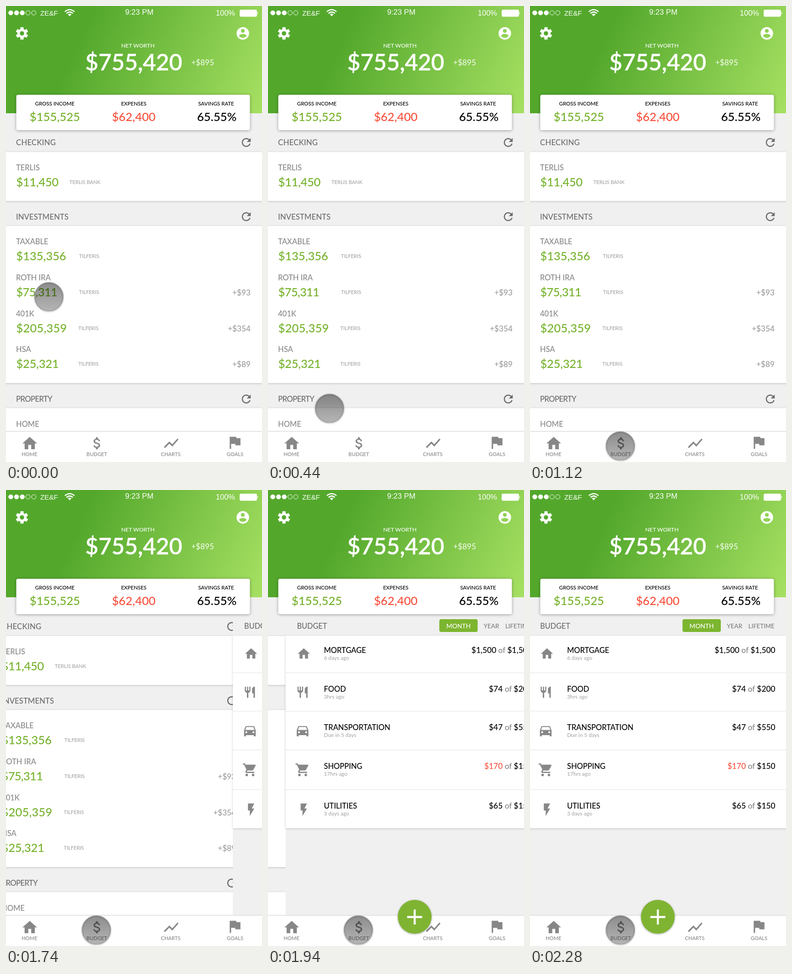
Write an HTML page that moves like this. It is 561 px wide and 999 px high and loops after 3080 ms.

```html
<!DOCTYPE html>
<html lang="en">
<head>
<meta charset="utf-8">
<title>Budget app</title>
<style>
html, body { margin: 0; width: 100%; height: 100%; overflow: hidden; background: #f0f0f0; }
svg { display: block; width: 100%; height: 100%; font-family: Lato, "Open Sans", sans-serif; font-weight: 500; }
.status { font-family: "Liberation Sans", Arial, sans-serif; font-weight: 400; }
.sheet { fill: #fff; filter: drop-shadow(0 1px 2px rgba(0,0,0,.2)); }
.card { fill: #fff; filter: drop-shadow(0 1px 3px rgba(0,0,0,.36)); }
.fab { fill: #7fb432; filter: drop-shadow(0 1px 2px rgba(0,0,0,.35)); }
.ring { filter: drop-shadow(0 1px 1.5px rgba(0,0,0,.4)); }
</style>
</head>
<body>
<svg id="stage" viewBox="0 0 561 999" preserveAspectRatio="none" xmlns="http://www.w3.org/2000/svg">
  <defs>
    <linearGradient id="sky" gradientUnits="userSpaceOnUse" x1="170" y1="60" x2="560" y2="235">
      <stop offset="0" stop-color="#53a82c"/><stop offset="1" stop-color="#a6e062"/>
    </linearGradient>
    <linearGradient id="press" x1="0" y1="0" x2="0" y2="1">
      <stop offset="0" stop-opacity=".45"/><stop offset="1" stop-opacity=".29"/>
    </linearGradient>
  </defs>
  <path id="route" d="M94 637C94 1006 198 840 198 964" fill="none"/>
  <rect width="561" height="999" fill="#f0f0f0"/>
  <g id="home"></g>
  <g id="budget"></g>
  <g id="header"></g>
  <g id="nav"></g>
  <g id="fab">
    <circle class="fab" cx="280" cy="935" r="37"/>
    <path d="M263.500 935.500H296.500M280 919V952" stroke="#fff" stroke-width="4.400"/>
  </g>
  <g id="touch">
    <circle r="31.500" fill="url(#press)"/>
    <circle class="ring" r="31.500" fill="none" stroke="#a4a4a4" stroke-width="1.200"/>
  </g>
</svg>
<script>
const $ = id => document.getElementById(id);

const GREEN = '#75b22b', RED = '#f9503c', GREY = '#878787', PALE = '#a2a2a2', DIM = '#6c6c6c';

// 24-unit icons: [path, centre x, centre y]
const icons = {
  home: ['M10 20v-6h4v6h5v-8h3L12 3 2 12h3v8z', 12, 11.5],
  refresh: ['M17.65 6.35C16.2 4.9 14.21 4 12 4c-4.42 0-7.99 3.58-7.99 8s3.57 8 7.99 8c3.73 0 6.84-2.55 7.73-6h-2.08c-.82 2.33-3.04 4-5.65 4-3.31 0-6-2.69-6-6s2.69-6 6-6c1.66 0 3.14.69 4.22 1.78L13 11h7V4z', 12, 12],
  user: ['M12 2a10 10 0 1 0 0 20 10 10 0 0 0 0-20zm0 3a3 3 0 1 1 0 6 3 3 0 0 1 0-6zm0 14.200c-2.500 0-4.710-1.280-6-3.220.03-1.990 4-3.080 6-3.080s5.970 1.090 6 3.080c-1.290 1.940-3.500 3.220-6 3.220z', 12, 12],
  dollar: ['M11.8 10.9c-2.27-.59-3-1.2-3-2.15 0-1.09 1.01-1.85 2.7-1.85 1.78 0 2.44.85 2.5 2.1h2.21c-.07-1.72-1.12-3.3-3.21-3.81V3h-3v2.16c-1.94.42-3.5 1.68-3.5 3.61 0 2.31 1.91 3.46 4.7 4.13 2.5.6 3 1.48 3 2.41 0 .69-.49 1.79-2.7 1.79-2.06 0-2.87-.92-2.98-2.1h-2.2c.12 2.19 1.76 3.42 3.68 3.83V21h3v-2.15c1.95-.37 3.5-1.5 3.5-3.55 0-2.84-2.43-3.81-4.7-4.4z', 11.4, 12],
  chart: ['M3.5 18.49l6-6.01 4 4L22 6.92l-1.41-1.41-7.09 7.97-4-4L2 16.99z', 12, 12],
  flag: ['M14.4 6L14 4H5v17h2v-7h5.6l.4 2h7V6z', 12.5, 12.5],
  fork: ['M11 9H9V2H7v7H5V2H3v7c0 2.12 1.66 3.84 3.75 3.97V22h2.5v-9.03C11.34 12.84 13 11.12 13 9V2h-2zm5-3v8h2.5v8H21V2c-2.76 0-5 2.24-5 4z', 12, 12],
  car: ['M18.92 6A1.500 1.500 0 0 0 17.500 5h-11a1.500 1.500 0 0 0-1.420 1L3 12v8a1 1 0 0 0 1 1h1a1 1 0 0 0 1-1v-1h12v1a1 1 0 0 0 1 1h1a1 1 0 0 0 1-1v-8zM6.500 16a1.500 1.500 0 1 1 0-3 1.500 1.500 0 0 1 0 3zm11 0a1.500 1.500 0 1 1 0-3 1.500 1.500 0 0 1 0 3zM5 11l1.500-4.500h11L19 11z', 12, 13],
  cart: ['M7 18a2 2 0 1 0 0 4 2 2 0 0 0 0-4zM1 2v2h2l3.6 7.59-1.35 2.45A2 2 0 0 0 7 17h12v-2H7.42c-.14 0-.25-.11-.25-.25l.93-1.75h7.45c.75 0 1.41-.41 1.75-1.03l3.58-6.49A1 1 0 0 0 20 4H5.21l-.94-2zm16 16a2 2 0 1 0 0 4 2 2 0 0 0 0-4z', 11, 12],
  bolt: ['M7 2v11h3v9l7-12h-4l4-8z', 12, 12]
};

function icon(name, x, y, scale, fill) {
  const [d, cx, cy] = icons[name];
  return `<path d="${d}" fill="${fill}" fill-rule="evenodd" transform="translate(${x} ${y}) scale(${scale}) translate(${-cx} ${-cy})"/>`;
}

function text(str, x, y, size, fill, anchor = 'start', extra = '') {
  return `<text x="${x}" y="${y}" font-size="${size}" fill="${fill}" text-anchor="${anchor}" ${extra}>${str}</text>`;
}

const sheet = (y, h) => `<rect class="sheet" x="-3" y="${y}" width="610" height="${h}"/>`;
const track = n => `letter-spacing="${n}"`;

function drawHome() {
  const sections = [['CHECKING', 299, 0.2], ['INVESTMENTS', 461.5, 0], ['PROPERTY', 861, -0.7]];
  // name, baseline, amount, institution, its x, change, tracking
  const accounts = [
    ['TERLIS', 360, '$11,450', 'TERLIS BANK', 139, '', -0.3],
    ['TAXABLE', 522, '$135,356', 'TILFERIS', 160, '', 0],
    ['ROTH IRA', 601, '$75,311', 'TILFERIS', 160, '+$93', -0.7],
    ['401K', 680, '$205,359', 'TILFERIS', 158.5, '+$354', 0.2],
    ['HSA', 758, '$25,321', 'TILFERIS', 158.5, '+$89', -0.2],
    ['HOME', 921.5]
  ];
  let out = sheet(320, 107) + sheet(482, 344) + sheet(881, 80);
  for (const [name, y, gap] of sections) {
    out += text(name, 22, y + 6, 16.8, DIM, 'start', track(gap)) + icon('refresh', 526.5, y, 1.22, DIM);
  }
  for (const [name, y, sum, bank, bankX, change, gap] of accounts) {
    out += text(name, 22, y, 16.5, GREY);
    if (!sum) continue;
    out += text(sum, 22.5, y + 35, 25.5, GREEN, 'start', track(gap));
    out += text(bank, bankX, y + 30, 11.1, PALE);
    if (change) out += text(change, 536, y + 33, 17.2, '#9a9a9a', 'end');
  }
  return out;
}

function drawBudget() {
  // icon, x, y, scale, name, baseline, note, spent, limit
  const rows = [
    ['home', 37, 358, 1.32, 'MORTGAGE', 357, '6 days ago', '$1,500', '$1,500'],
    ['fork', 34.3, 443, 1.23, 'FOOD', 441.5, '3hrs ago', '$74', '$200'],
    ['car', 34.3, 528.5, 1.42, 'TRANSPORTATION', 526, 'Due in 5 days', '$47', '$550'],
    ['cart', 33, 613, 1.4, 'SHOPPING', 610.5, '17hrs ago', '$170', '$150'],
    ['bolt', 37, 700.5, 1.38, 'UTILITIES', 698, '3 days ago', '$65', '$150']
  ];
  let out = '<rect x="-3" y="235" width="620" height="720" fill="#f0f0f0"/>' + sheet(319, 422);
  out += '<path d="M-3 400.500H600M-3 484.500H600M-3 569.500H600M-3 656.500H600" stroke="#e3e3e3"/>';
  out += text('BUDGET', 22, 303.5, 16.3, DIM);
  out += '<rect x="334" y="283" width="84" height="28" rx="4" fill="#7cb52f"/>';
  out += text('MONTH', 376, 302.5, 13.8, '#fff', 'middle');
  out += text('YEAR', 448, 302.5, 13.5, '#7c7c7c', 'middle');
  out += text('LIFETIME', 507, 302.5, 13.2, '#7c7c7c', 'middle');
  for (const [pic, x, y, scale, name, base, note, spent, limit] of rows) {
    const tint = pic === 'cart' ? RED : '#000';
    out += icon(pic, x, y, scale, GREY) + text(name, 81, base, 16.5, '#000');
    out += text(note, 81, base + 15.3, 11.9, '#a8a8a8');
    out += text(`<tspan fill="${tint}">${spent}</tspan> of <tspan fill="#000">${limit}</tspan>`, 537.5, base, 17.4, '#858585', 'end');
  }
  return out;
}

function drawStatus() {
  let out = '';
  for (let i = 0; i < 5; i++) {
    out += `<circle cx="${10.5 + i * 12.600}" cy="15" r="4.800" stroke="#fff" fill="${i < 3 ? '#fff' : 'none'}"/>`;
  }
  out += '<path d="M129 12.500Q139.500 3.500 150 12.500M132.500 16.200Q139.500 10 146.500 16.200" stroke="#fff" stroke-width="2.600" fill="none"/>';
  out += '<path d="M135.500 18.300Q139.500 15 143.500 18.300L139.500 22.500z" fill="#fff"/>';
  out += '<rect x="512" y="8" width="38" height="15.500" rx="3.500" fill="#fff"/><path d="M551 12.500q3 3.200 0 6.500z" fill="#fff"/>';
  out += text('ZE&amp;F', 75, 20.500, 15.2, '#fff') + text('9:23 PM', 292, 19, 16.7, '#fff', 'middle');
  out += text('100%', 502, 21, 16.5, '#fff', 'end');
  return `<g class="status">${out}</g>`;
}

function drawHeader() {
  let out = '<rect width="561" height="235" fill="url(#sky)"/>' + drawStatus();
  let gear = '<circle r="7.400" fill="none" stroke-width="5.200"/>';
  for (let a = 0; a < 360; a += 60) gear += `<path d="M0-13.500V-8" stroke-width="7" transform="rotate(${a})"/>`;
  out += `<g transform="translate(35 60)" stroke="#fff">${gear}</g>` + icon('user', 519, 60, 1.37, '#fff');
  out += text('NET WORTH', 289, 91, 12.3, '#fff', 'middle');
  out += text('$755,420', 280, 141, 49.6, '#fff', 'middle', 'stroke="#fff" stroke-width=".7"');
  out += text('+$895', 406, 129.5, 17.2, '#fff', 'start', 'opacity=".88"');
  out += '<rect class="card" x="22.500" y="194.500" width="512" height="77.500" rx="4"/>';
  const stats = [
    ['GROSS INCOME', '$155,525', 107, 107, GREEN],
    ['EXPENSES', '$62,400', 280, 280, RED],
    ['SAVINGS RATE', '65.55%', 460.5, 462, '#000']
  ];
  for (const [label, value, labelX, valueX, fill] of stats) {
    out += text(label, labelX, 217.5, 11.5, '#000', 'middle') + text(value, valueX, 252, 25.8, fill, 'middle');
  }
  return out;
}

function drawNav() {
  const tabs = [
    ['home', 52, 957.5, 1.6, 'HOME', 51.5],
    ['dollar', 199, 958, 1.47, 'BUDGET', 199],
    ['chart', 362, 958, 1.6, 'CHARTS', 361],
    ['flag', 502, 957, 1.57, 'GOALS', 502]
  ];
  let out = '<rect y="931" width="561" height="68" fill="#fff"/><rect y="931" width="561" height="1.500" fill="#dcdcdc"/>';
  for (const [pic, x, y, scale, label, labelX] of tabs) {
    out += icon(pic, x, y, scale, GREY) + text(label, labelX, 985.5, 11.2, GREY, 'middle');
  }
  return out;
}

$('home').innerHTML = drawHome();
$('budget').innerHTML = drawBudget();
$('header').innerHTML = drawHeader();
$('nav').innerHTML = drawNav();

const LOOP = 3080, STEP = 20, DRAG = 1120, SLIDE = 1740, WIDTH = 564;
const route = $('route'), routeLength = route.getTotalLength();
const moveX = (id, x) => $(id).setAttribute('transform', `translate(${x.toFixed(2)} 0)`);

// Critically damped spring, already 31 ms under way when the slide shows.
function slideLeft(t) {
  if (t < SLIDE) return 1;
  const k = 18.5 * (t - SLIDE + 31) / 1000;
  return (1 + k) * Math.exp(-k);
}

function render(t) {
  const drag = 1 - Math.pow(1 - Math.min(t / DRAG, 1), 2.35);
  const p = route.getPointAtLength(drag * routeLength);
  $('touch').setAttribute('transform', `translate(${p.x.toFixed(2)} ${p.y.toFixed(2)})`);

  const left = slideLeft(t);
  moveX('home', -(1 - left) * WIDTH / 2);
  moveX('budget', left * WIDTH);
  moveX('fab', left * WIDTH);
  // keeps the sheet's shadow off the right edge at rest
  $('budget').setAttribute('visibility', t < SLIDE ? 'hidden' : 'visible');
}

const start = performance.now();
function tick() {
  const t = (performance.now() - start) % LOOP;
  render(Math.floor(t / STEP) * STEP);
  requestAnimationFrame(tick);
}
tick();
</script>
</body>
</html>
```
